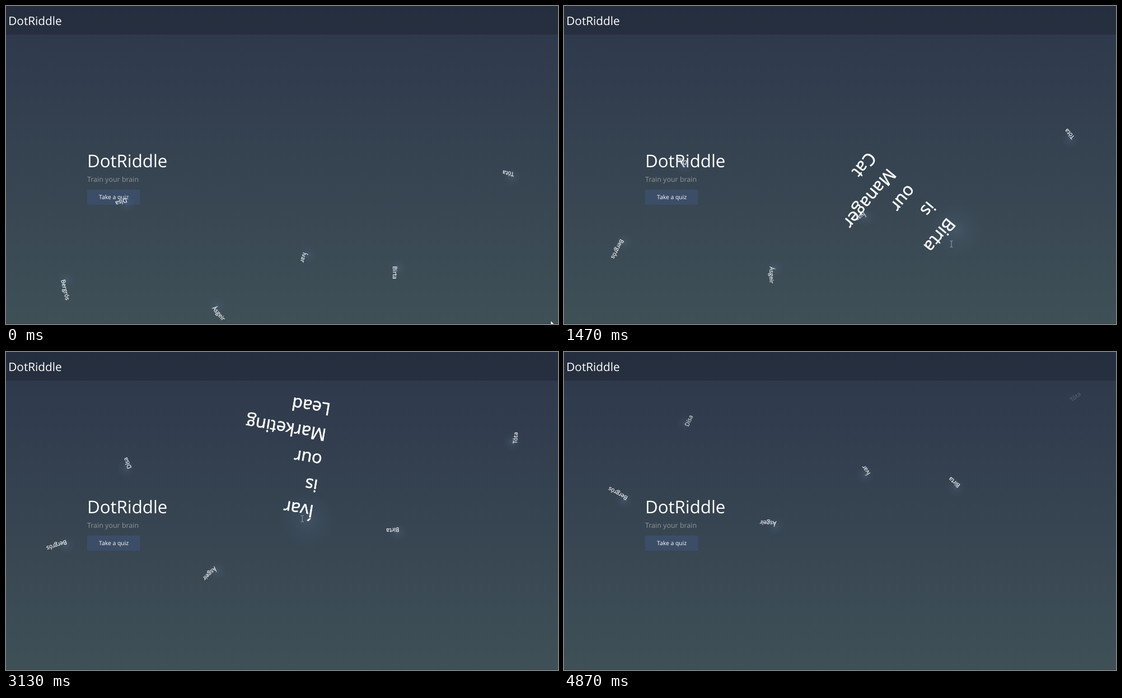
Recreate the animation shown at these times as an HTML page. Size 986x568 px, loop 4940 ms.

```html
<!DOCTYPE html>
<html lang="en">
<head>
<meta charset="utf-8">
<title>DotRiddle</title>
<style>
  html, body { margin: 0; width: 100%; height: 100%; overflow: hidden; background: #2d374b; }
  svg { display: block; width: 986px; height: 568px; }
  text { font-family: "Open Sans", "Noto Sans", sans-serif; fill: #fff; text-rendering: geometricPrecision; }
  .floater text, .button { font-size: 10.4px; }
  .floater text { stroke: #fff; stroke-width: .2px; vector-effect: non-scaling-stroke; }
</style>
</head>
<body>
<svg id="stage" viewBox="0 0 986 568">
  <defs>
    <linearGradient id="sky" x2="0" y2="1">
      <stop stop-color="#2d374b"/>
      <stop offset="1" stop-color="#3f5057"/>
    </linearGradient>
    <radialGradient id="glow">
      <stop stop-color="#5a6c86" stop-opacity=".36"/>
      <stop offset=".4" stop-color="#4e647f" stop-opacity=".18"/>
      <stop offset="1" stop-color="#46607e" stop-opacity="0"/>
    </radialGradient>
  </defs>
  <rect width="986" height="568" fill="url(#sky)"/>
  <rect width="986" height="51" fill="#000" opacity=".17"/>
  <rect y="567" width="986" height="1" fill="#364248"/>
  <text x="4.2" y="33.6" font-size="20.8">DotRiddle</text>
  <text x="145" y="288" font-size="31.2">DotRiddle</text>
  <text x="145" y="313.6" font-size="12.48" style="fill:#8e9599">Train your brain</text>
  <rect x="145" y="328" width="94.5" height="27" rx="1" fill="#3c4d67"/>
  <text class="button" x="166" y="345.3">Take a quiz</text>
  <g id="floaters"></g>
  <path id="arrow" d="M0 0V9.8L2.3 7.8 3.8 11.2 5.4 10.5 4 7.2H7Z" fill="#fff" stroke="#1c232c" stroke-width=".6"/>
  <path id="beam" d="M-2.5-5.5H-.5L0-5 .5-5.5H2.5M0-5V5M-2.5 5.5H-.5L0 5 .5 5.5H2.5" fill="none" stroke="#a9b0b6" stroke-width=".9"/>
</svg>
<script>
const LOOP = 4940, TICK = 1000 / 15, LAST_TICK = 73;
const RISE = 46.2, SPIN = 27;          // px and degrees per second
const TEXT_X = -2.7, TEXT_Y = 9.1, LINE = 15.6, GROW_MS = 1000;

// x and y of the pivot and the angle at the start; hover = [enter, leave] in ms
const people = [
  { name: 'Tóta', x: 904, y: 305.5, angle: 189 },
  { name: 'Dísa', x: 215, y: 352.5, angle: 161.6 },
  { name: 'Ívar', x: 538.5, y: 444.4, angle: 104.8, role: 'is our Marketing Lead', hover: [2315, 3460] },
  { name: 'Birta', x: 700.2, y: 467.5, angle: 90.1, role: 'is our Manager Cat', hover: [675, 1670] },
  { name: 'Bergrós', x: 107.7, y: 490, angle: 77 },
  { name: 'Ásgeir', x: 376.5, y: 536, angle: 51 }
];

// time, x, y
const pointerPath = [
  [0, 973, 562], [200, 900, 525], [530, 735, 455], [800, 692, 428], [1500, 692, 425],
  [1700, 645, 418], [1930, 536, 403], [2130, 531, 350], [2315, 530, 320], [2670, 530, 308],
  [3300, 529, 294], [3600, 526, 285], [3800, 530, 310], [4270, 560, 548], [4400, 565, 590], [4940, 565, 590]
];

const byId = id => document.getElementById(id);
const clamp = v => Math.min(1, Math.max(0, v));

function add(parent, tag, attrs, content = '') {
  const el = document.createElementNS(parent.namespaceURI, tag);
  for (const key in attrs) el.setAttribute(key, attrs[key]);
  el.textContent = content;
  return parent.appendChild(el);
}

// cubic-bezier(.25, .1, .25, 1)
function ease(u) {
  u = clamp(u);
  const curve = (a, b, s) => 3 * a * s * (1 - s) ** 2 + 3 * b * s * s * (1 - s) + s ** 3;
  let lo = 0, hi = 1;
  for (let i = 0; i < 24; i++) {
    const mid = (lo + hi) / 2;
    if (curve(.25, .25, mid) < u) lo = mid; else hi = mid;
  }
  return curve(.1, 1, lo);
}

for (const p of people) {
  p.el = add(byId('floaters'), 'g', { class: 'floater' });
  add(p.el, 'circle', { r: 17, fill: 'url(#glow)' });
  const addLine = (word, i) => add(p.el, 'text', { x: TEXT_X, y: TEXT_Y + LINE * i }, word);
  addLine(p.name, 0);
  p.words = (p.role ? p.role.split(' ') : []).map((word, i) => addLine(word, i + 1));
}

function growth([enter, leave], t) {
  return ease((t - enter) / GROW_MS) - ease((t - leave) / GROW_MS);
}

function drawPerson(p, t) {
  const y = p.y - RISE * t / 1000;
  const angle = p.angle + SPIN * t / 1000;
  const grown = p.hover ? growth(p.hover, t) : 0;
  p.el.setAttribute('transform', `translate(${p.x} ${y}) rotate(${angle}) scale(${1 + 2 * grown})`);
  p.el.setAttribute('opacity', clamp((y - 66) / 76));
  p.words.forEach(word => word.setAttribute('opacity', clamp(grown * 1.06)));
}

function drawPointer(t) {
  const i = pointerPath.findIndex(stop => stop[0] > t);
  const [t0, x0, y0] = pointerPath[i - 1], [t1, x1, y1] = pointerPath[i];
  const u = (t - t0) / (t1 - t0);
  const overText = people.some(p => p.hover && t >= p.hover[0] && t < p.hover[1]);
  const place = `translate(${x0 + (x1 - x0) * u} ${y0 + (y1 - y0) * u})`;
  for (const [id, shown] of [['arrow', !overText], ['beam', overText]]) {
    byId(id).setAttribute('transform', place);
    byId(id).setAttribute('visibility', shown ? 'visible' : 'hidden');
  }
}

const start = performance.now();
function draw() {
  const elapsed = Math.max(0, performance.now() - start) % LOOP;
  const t = Math.min(LAST_TICK, Math.floor((elapsed + 5) / TICK)) * TICK;
  people.forEach(p => drawPerson(p, t));
  drawPointer(t);
  requestAnimationFrame(draw);
}
draw();
</script>
</body>
</html>
```
